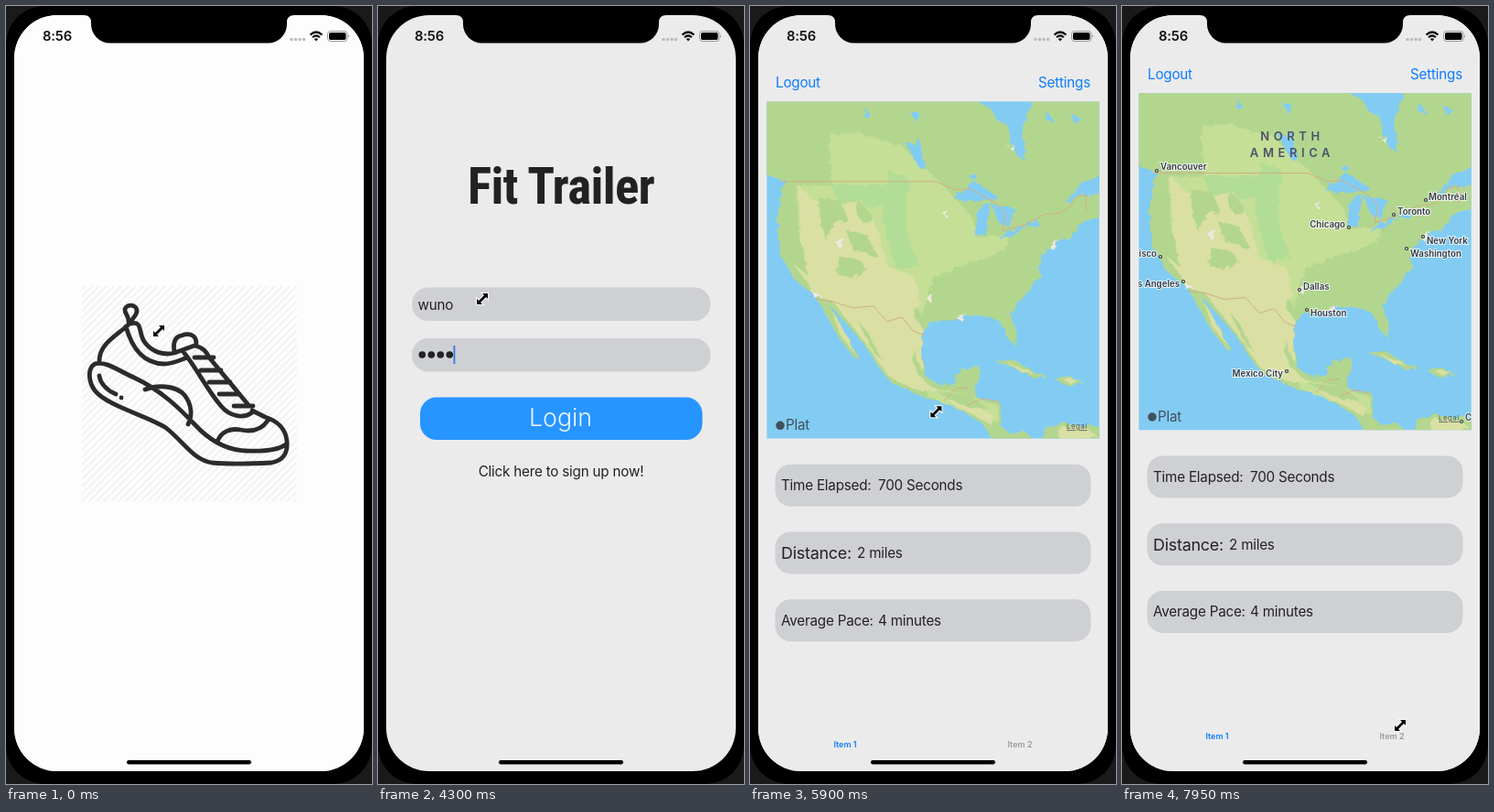
Write an HTML page that moves like this. It is 400 px wide and 850 px high and loops after 8 s.

```html
<!DOCTYPE html>
<html lang="en">
<head>
<meta charset="utf-8">
<title>Running app</title>
<style>
  html, body { margin: 0; width: 100%; height: 100%; overflow: hidden; background: #000; }
  svg { display: block; width: 400px; height: 850px; }
  text { font: 15.2px Inter, sans-serif; letter-spacing: -.013em; fill: #222; }
  .mid { text-anchor: middle; }
  .end { text-anchor: end; }
  .title { font: 700 55px "Roboto Condensed", Roboto, sans-serif; font-stretch: condensed; letter-spacing: -.7px; }
  .clock { font-weight: 600; font-size: 14.8px; fill: #111; }
  .login { font-size: 26.8px; font-weight: 300; fill: #edf5ff; letter-spacing: 0; }
  .big { font-size: 17.9px; }
  .blue { fill: #0a7cff; }
  .hint { fill: #9b9b9f; }
  .tab { font-size: 9px; font-weight: 600; letter-spacing: 0; }
  .city { font-size: 9.7px; font-weight: 600; letter-spacing: 0; fill: #343a44; stroke: #fffc; stroke-width: 2px; paint-order: stroke; }
  .region { font-size: 13px; font-weight: 600; fill: #4c5167; letter-spacing: 4.6px; }
  .line { fill: none; stroke: #2b2b2b; stroke-width: 4.8; stroke-linecap: round; stroke-linejoin: round; }
  .field { fill: #cfd0d4; }
</style>
</head>
<body>
<svg viewBox="0 0 400 850">
  <defs>
    <clipPath id="screen"><rect x="9" y="10" width="382" height="826" rx="47"/></clipPath>
    <clipPath id="mapBox"><rect x="18.4" y="95.3" width="363.3" height="368"/></clipPath>
    <pattern id="hatch" width="8" height="8" patternUnits="userSpaceOnUse">
      <path d="M-2 2L2-2M-2 10L10-2M6 10L10 6" stroke="#f1f1f1" stroke-width="1.6"/>
    </pattern>
    <!-- the alpha channel averages one half, so edges get rough without drifting -->
    <filter id="rough" x="0" y="0" width="1" height="1" color-interpolation-filters="sRGB">
      <feTurbulence type="fractalNoise" baseFrequency=".13" numOctaves="3" seed="4"/>
      <feDisplacementMap in="SourceGraphic" scale="8" xChannelSelector="A" yChannelSelector="A"/>
    </filter>
  </defs>
  <rect width="400" height="850" fill="#1a1a1a"/>
  <rect width="400" height="850" rx="42"/>

  <g clip-path="url(#screen)">
    <rect width="400" height="850" fill="#ebebeb"/>

    <!-- login -->
    <text class="title mid" x="200" y="215.5">Fit Trailer</text>
    <rect class="field" x="37" y="307.5" width="326.5" height="36.5" rx="18"/>
    <rect class="field" x="37" y="363" width="326.5" height="36.5" rx="18"/>
    <text id="user" x="43.5" y="332"></text>
    <text id="pass" class="hint" x="43.5" y="387">Password</text>
    <g id="dots" fill="#222"></g>
    <rect id="caret" width="1.8" height="20" fill="#3478e5"/>
    <rect x="46" y="427.5" width="308.5" height="46.5" rx="18" fill="#2795ff"/>
    <text id="login" class="login mid" x="199.5" y="458.5">Login</text>
    <text class="mid" x="200" y="514">Click here to sign up now!</text>

    <!-- run summary -->
    <g id="run">
      <rect width="400" height="850" fill="#ebebeb"/>
      <text class="blue" x="28" y="80">Logout</text>
      <text class="blue end" x="372" y="80">Settings</text>
      <g clip-path="url(#mapBox)">
        <rect x="18" y="95" width="364" height="369" fill="#82ccf3"/>
        <g transform="translate(0 -64.5)">
          <g filter="url(#rough)">
            <path fill="#b3d68f" d="M0 140H400V280L382 286 366 290 352 302 349 309 329 318 318 330 316 340 318 350 300 370 284 391 291 412 290 427 282 418 275 402 262 394 235 394 222 398 200 400 190 410 188 440 192 460 205 469 222 468 230 453 252 450 252 460 245 474 250 485 272 487 275 500 273 513 285 523 300 520 312 530V545H275L255 512 235 500 215 489 195 485 175 476 155 467 143 453 125 425 108 405 88 383 103 410 119 440 113 438 97 418 80 387 72 372 58 362 47 352 35 330 31 310 30 285 36 262 30 249 0 228ZM312 545L325 515 345 511 400 517V545ZM266 442L290 443 312 456 327 461 308 461 285 449ZM332 462L345 459 364 467 348 471Z"/>
            <path fill="#c5df97" d="M86 196L120 194 165 208 205 245 242 285 250 308 285 305 275 325 240 335 200 352 188 395 175 365 130 350 100 300 88 240ZM48 250L110 252 90 300 45 320ZM190 470L230 478 272 492 270 510 235 498 196 483Z"/>
            <path fill="#b2dd96" d="M150 235L175 245 170 300 185 340 160 345 145 290ZM88 250L150 250 148 275 100 275Z"/>
            <path fill="#dadfa3" d="M52 250L70 268 105 272 122 268 140 300 150 340 180 350 186 378 180 395 190 410 187 440 190 465 205 476 180 475 152 460 125 422 92 380 70 368 50 340 56 305ZM90 389L104 412 116 436 98 414ZM340 461L360 465 350 468ZM280 444L310 456 300 457ZM335 517L365 514 380 526 340 530ZM215 485L245 489 268 505 262 511 232 496Z"/>
            <path fill="#b3d68f" d="M36 252L52 255 53 300 64 350 38 330 32 290ZM75 265L98 268 108 290 92 293 82 310 77 290ZM105 300L128 305 140 330 112 322ZM98 328L122 334 128 344 112 353 95 348ZM120 268L134 285 126 295 116 282ZM117 398L129 412 145 443 135 434ZM178 428L186 450 198 469 181 456ZM202 476L240 480 262 497 235 493Z"/>
            <path fill="#82ccf3" d="M246 130L250 160 262 167 270 180 282 186 285 205 293 220 301 224 300 205 296 190 302 178 308 165 305 130ZM222 266L245 247 272 264 246 269ZM246 307L249 277 263 272 257 305ZM264 272L291 276 283 296 272 292ZM271 310L282 302 300 296 287 307ZM294 297L317 288 312 296ZM170 204L180 207 186 199 192 235 184 231 178 220ZM345 270L360 251 400 228V260L362 262ZM175 170L188 174 180 180ZM125 165L132 176 126 178ZM350 173L362 178 354 182ZM325 170L333 182 323 180ZM238 240L246 238 244 246ZM18 240L40 247 33 256Z"/>
            <path fill="#eee9df" d="M92 312L102 309 99 322ZM192 374L201 372 198 380ZM210 280L217 280 214 286ZM225 396L237 392 231 399ZM326 317L338 312 330 321ZM68 367L78 372 71 375ZM282 209L289 207 287 213Z"/>
          </g>
          <path d="M35 247H203L224 256 240 255 268 270 280 283 276 301 300 294 322 283 340 281 352 272 357 263 367 262V280M72 376L90 378 112 385 135 383 150 400 166 395 178 410 190 415M212 487L225 473 238 472M238 491L255 484 272 488" fill="none" stroke="#d2ad82"/>
        </g>
        <g id="labels">
          <text class="region mid" x="186" y="147">NORTH</text>
          <text class="region mid" x="186" y="164.5">AMERICA</text>
        </g>
        <circle cx="33" cy="449" r="4.7" fill="#40505c"/>
        <text x="39" y="454" style="fill:#40505c">Plat</text>
        <text x="346" y="453" style="font-size:8px;letter-spacing:.4px;text-decoration:underline;fill:#4b5a63">Legal</text>
      </g>
      <g id="stats"></g>
      <text class="tab blue mid" x="104" y="801">Item 1</text>
      <text class="tab mid" x="295" y="801" style="fill:#999">Item 2</text>
    </g>

    <!-- splash -->
    <g id="splash">
      <rect width="400" height="850" fill="#fdfdfd"/>
      <rect x="83" y="306" width="235" height="235" fill="url(#hatch)"/>
      <path class="line" d="M97 391C88 397 91 412 97 420C110 437 158 449 175 461C195 477 205 496 225 499C245 501 270 500 290 499C303 497 308 488 307 476C306 462 296 453 283 449L269 442M97 391C110 388 120 397 140 406C170 420 190 440 207 458C222 474 240 485 262 486C285 487 298 485 306 479M102 388C102 370 118 362 133 349M134 347C135 338 129 336 130 331C132 325 143 326 143 333C143 339 137 341 136 347M131 350C138 375 150 390 172 391C183 391 190 387 198 384M136 347C150 343 144 358 152 368C160 378 172 382 184 379L206 371M184 378C182 366 186 361 192 360C200 357 208 359 208 369M194 378C210 398 220 420 235 437C245 449 260 451 269 444M206 371C216 373 219 378 222 384L265 436M206 384H227M213 398H235M222 411H245M233 424H255M249 437H270M231 476C235 465 245 461 256 463C270 466 280 462 286 453M152 419C165 414 185 414 195 425C203 435 204 448 199 457M102 404C103 412 110 420 120 424M126 428h.1"/>
    </g>
  </g>

  <!-- phone chrome -->
  <path d="M85 9V10Q93 10 93 18V20A20.500 20.500 0 0 0 113.500 40.500H286.500A20.500 20.500 0 0 0 307 20V18Q307 10 315 10V9Z"/>
  <text class="clock" x="40" y="38">8:56</text>
  <path d="M312 36.5h.1m4.4 0h.1m4.4 0h.1m4.4 0h.1" stroke="#bbb" stroke-width="3.4" stroke-linecap="round"/>
  <path d="M332.5 31.5Q339 25.5 345.5 31.5M335 34.3Q339 30.7 343 34.3" fill="none" stroke="#111" stroke-width="2.2"/>
  <path d="M336.800 36Q339 34.300 341.200 36L339 38.500Z" fill="#111"/>
  <rect x="351.5" y="27.5" width="21.5" height="11" rx="3" fill="none" stroke="#999"/>
  <rect x="353" y="29" width="18.5" height="8" rx="1.7"/>
  <path d="M374.3 31.3q2 1.7 0 3.4z" fill="#999"/>
  <rect x="132" y="824" width="136" height="4.5" rx="2.2"/>
  <path id="cursor" d="M6-6V0L4-2-2 4 0 6H-6V0L-4 2 2-4 0-6Z" stroke="#fff" stroke-width="2" paint-order="stroke"/>
</svg>

<script>
const LOOP = 8000;
const $ = id => document.getElementById(id);
const el = Object.fromEntries(
  ['user', 'pass', 'dots', 'caret', 'login', 'run', 'labels', 'splash', 'cursor'].map(id => [id, $(id)]));

// label, x, baseline, dot x, dot y; labels left of their dot are end-aligned
const cities = [
  ['Vancouver', 42, 179, 38, 180], ['Montréal', 335, 212, 332, 212],
  ['Toronto', 301, 228, 297, 228], ['Chicago', 244, 242, 248, 242],
  ['New York', 333, 260, 329, 252], ['Washington', 315, 274, 311, 265],
  ['San Francisco', 38, 274, 42, 274], ['Los Angeles', 63, 307, 67, 301],
  ['Dallas', 198, 310, 194, 310], ['Houston', 206, 339, 202, 332],
  ['Mexico City', 176, 405, 180, 399], ['Caracas', 375, 453, 371, 454]
];
el.labels.innerHTML += cities.map(([name, x, y, cx, cy]) =>
  `<text class="city ${x < cx ? 'end' : ''}" x="${x}" y="${y}">${name}</text>
   <circle cx="${cx}" cy="${cy}" r="1.5" fill="#ddd" stroke="#343a44" stroke-width="1.2"/>`).join('');

const stats = [
  ['Time Elapsed:', '700 Seconds', 140, ''],
  ['Distance:', '2 miles', 117, 'big'],
  ['Average Pace:', '4 minutes', 140, '']
];
$('stats').innerHTML = stats.map(([label, value, x, size], i) => {
  const y = 491.5 + i * 73.7;
  return `<rect class="field" x="27.5" y="${y}" width="345" height="46" rx="17"/>
    <text class="${size}" x="34" y="${y + (size ? 29.5 : 28.5)}">${label}</text>
    <text x="${x}" y="${y + 28.5}">${value}</text>`;
}).join('');

el.dots.innerHTML = [0, 1, 2, 3].map(i => `<circle cx="${48.3 + i * 10}" cy="381" r="3.8"/>`).join('');

const name = 'wuno';
const nameKeys = [2550, 2800, 2950, 3100];
const passKeys = [3700, 3850, 4000, 4150];
const FOCUS = 1600, TAB = 3400, BLUR = 5350;
const path = [
  [0, 167, 355], [350, 167, 355], [1050, 128, 317], [1200, 128, 317], [1600, 114, 320],
  [4600, 114, 320], [5150, 202, 444], [5850, 202, 444], [6100, 215, 437],
  [6250, 215, 437], [7100, 304, 786], [LOOP, 304, 786]
];

const clamp = v => Math.min(1, Math.max(0, v));
const ramp = (t, from, to) => clamp((t - from) / (to - from));
const smooth = p => p * p * (3 - 2 * p);
const typed = (t, keys) => keys.filter(k => t >= k).length;

function cursorAt(t) {
  const i = path.findIndex(p => p[0] > t);
  const [t0, x0, y0] = path[i - 1], [t1, x1, y1] = path[i];
  const p = smooth(ramp(t, t0, t1));
  return [x0 + (x1 - x0) * p, y0 + (y1 - y0) * p];
}

function drawForm(t) {
  const letters = typed(t, nameKeys), bullets = typed(t, passKeys);
  el.user.textContent = letters ? name.slice(0, letters) : 'Username';
  el.user.classList.toggle('hint', !letters);
  el.pass.style.opacity = bullets ? 0 : 1;
  [...el.dots.children].forEach((dot, i) => dot.style.opacity = i < bullets ? 1 : 0);

  const inPass = t >= TAB;
  const lastKey = Math.max(FOCUS, ...[...nameKeys, TAB, ...passKeys].filter(k => k <= t));
  const lit = (t - lastKey) % 1000 < 550;
  const x = inPass ? 43.3 + bullets * 9.8 : 43.5 + (letters ? el.user.getComputedTextLength() : 0);
  el.caret.setAttribute('x', x);
  el.caret.setAttribute('y', inPass ? 371 : 316);
  el.caret.style.opacity = t >= FOCUS && t < BLUR && lit ? 1 : 0;
  el.login.style.opacity = t > 5230 && t < 5420 ? .4 : 1;
}

function draw(t) {
  el.splash.style.opacity = 1 - ramp(t, 400, 750);
  drawForm(t);
  const slide = 826 * (1 - ramp(t, 5500, 6000)) ** 2.77;
  el.run.setAttribute('transform', `translate(0 ${slide})`);
  el.run.style.display = t < 5500 ? 'none' : '';
  el.labels.style.opacity = ramp(t, 5900, 6200);
  el.cursor.setAttribute('transform', `translate(${cursorAt(t)})`);
}

function tick() {
  draw(performance.now() % LOOP);
  requestAnimationFrame(tick);
}
tick();
</script>
</body>
</html>
```
